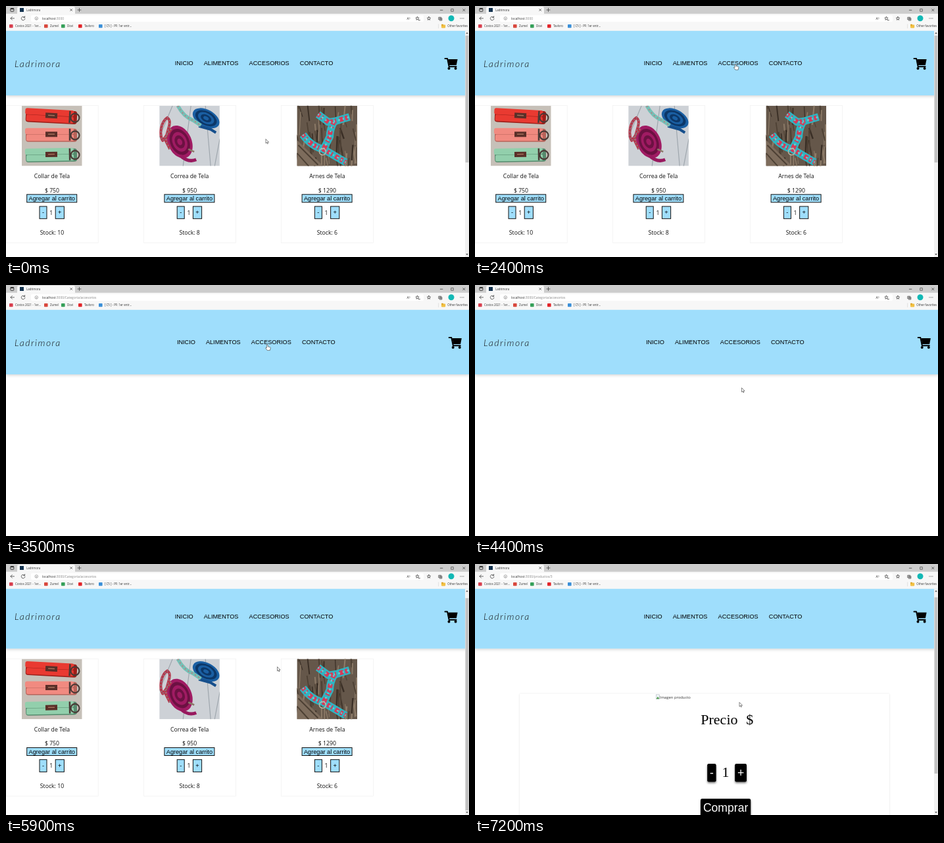
An HTML page that plays this animation: 704 px wide and 382 px high, repeating every 8 s.

```html
<!DOCTYPE html>
<html lang="es">
<head>
<meta charset="utf-8">
<title>Ladrimora</title>
<style>
  html, body { margin: 0; width: 100%; height: 100%; overflow: hidden; background: #fff; }
  svg { display: block; position: absolute; left: 0; top: 0; }
  text { white-space: pre; }
  .ui { font: 4.9px "Open Sans", "Noto Sans", sans-serif; fill: #333; }
  .mark { font-size: 4.4px; }
  .nav { font: 9.17px "Liberation Sans", Arial, sans-serif; }
  .body { font: 8.7px "Open Sans", "Noto Sans", sans-serif; fill: #111; }
  .serif { font: 22px "Liberation Serif", "Times New Roman", serif; }
  .big { font: 17.6px "Liberation Sans", Arial, sans-serif; fill: #fff; }
  .logo { font: italic 300 14px Lato, sans-serif; letter-spacing: 1.5px; fill: #111; }
  .mid { text-anchor: middle; }
  .line { fill: none; stroke: #444; stroke-width: .8; stroke-linecap: round; stroke-linejoin: round; }
</style>
</head>
<body>
<svg id="stage" width="704" height="382" viewBox="0 0 704 382"></svg>
<script>
const LOOP = 8000, TICK = 100;
const BLUE = '#9fdefc';

const rect = (x, y, w, h, fill, extra = '') =>
  `<rect x="${x}" y="${y}" width="${w}" height="${h}" fill="${fill}" ${extra}/>`;
const dot = (x, y, r, fill) => `<circle cx="${x}" cy="${y}" r="${r}" fill="${fill}"/>`;
const text = (x, y, cls, s, extra = '') => `<text x="${x}" y="${y}" class="${cls}" ${extra}>${s}</text>`;
const line = (d, extra = '') => `<path class="line" d="${d}" ${extra}/>`;
const stroke = (d, color, width, extra = '') =>
  `<path d="${d}" fill="none" stroke="${color}" stroke-width="${width}" stroke-linejoin="round" ${extra}/>`;
const group = (id, s, extra = '') => `<g id="${id}" ${extra}>${s}</g>`;

function seeded(seed) {
  return () => (seed = seed * 16807 % 2147483647) / 2147483647;
}

// Product pictures, each 91.7 square
function collars() {
  const strap = (y, color, dark, tilt) => `<g transform="rotate(${tilt} 46 ${y})">` +
    rect(6, y - 9, 78, 20, dark, 'rx="4"') + rect(5, y - 10, 74, 9.5, color, 'rx="3"') +
    rect(7, y, 72, 9.5, color, 'rx="2"') + rect(36, y - 4.5, 18, 8, '#5a2f28') +
    rect(40, y - 1.5, 10, 1.5, '#a3705a') +
    stroke(`M73 ${y - 9}V${y + 9}`, '#4a3a36', 2.5) +
    `<circle cx="81" cy="${y + 1}" r="6.5" fill="none" stroke="#4a3a36" stroke-width="2.2"/></g>`;
  return rect(0, 0, 91.7, 91.7, '#c6c0b8') +
    strap(15.5, '#e93a31', '#9c1f1a', 3) + strap(44, '#f18a80', '#b8635a', 0) +
    strap(74.5, '#92cfac', '#568b6e', -1);
}

function leashes() {
  const coil = (x, y, rx, ry, tilt, a, b) => [1, .8, .6, .4, .2].map((k, i) =>
    `<ellipse cx="${x}" cy="${y}" rx="${rx * k}" ry="${ry * k}" fill="${i % 2 ? b : a}" transform="rotate(${tilt} ${x} ${y})"/>`).join('');
  const loop = 'M28 0Q37 17 51 22L63 30';
  const strap = 'M18 35L5 53C-1 42 3 24 12 18Q18 22 14 34L9 52L16 66';
  return rect(0, 0, 91.7, 91.7, '#cdd1d6') +
    stroke('M20 0L0 48M48 0L36 92M70 0L78 92M92 50L84 92', '#9ea6ad', 1.2) +
    coil(71, 19, 22, 13, 28, '#1a5fa3', '#0c3768') +
    stroke('M60 31L78 36L86 41', '#164f8c', 4) +
    stroke(loop, '#75c0b6', 5.5) + stroke(loop, '#c96d78', 1.5, 'stroke-dasharray="2 4"') +
    coil(31, 55, 18, 26, -24, '#a01b63', '#6c1142') +
    stroke('M32 76Q44 87 56 82', '#98195e', 5) +
    stroke(strap, '#b5364a', 4) + stroke(strap, '#78989c', 1.2, 'stroke-dasharray="2 3"') +
    stroke('M44 66L53 70', '#8c7868', 2.5);
}

function harness() {
  const bands = 'M32 13L48 25L60 23L80 17M56 25Q50 36 50 47L40 67M9 44Q22 62 40 66L74 86';
  const random = seeded(7);
  const bark = Array.from({ length: 60 }, (_, i) => {
    const x = random() * 92, y = random() * 92 - 12;
    return stroke(`M${x} ${y}l${6 - random() * 10} ${14 + random() * 22}`,
      ['#3a2f26', '#8d7b68', '#4d4034'][i % 3], 1 + random() * 1.6);
  }).join('');
  return rect(0, 0, 91.7, 91.7, '#65574a') + bark +
    '<path d="M0 52L40 92H0Z" fill="#7d6c5c"/>' +
    stroke('M2 60L32 90M0 72L18 92', '#4d4034', 2) +
    stroke(bands, '#2fb4c2', 11.5) +
    stroke(bands, '#d63a58', 7, 'stroke-dasharray="4 3 2 5 6 3"') +
    stroke(bands, '#62cdd0', 2.5, 'stroke-dasharray="2 5 3 4"') +
    '<circle cx="39" cy="70" r="5" fill="none" stroke="#b9b6a5" stroke-width="1.5"/>';
}

function product(i, picture, name, price, stock) {
  const btn = (x, y, w, h, label, ty) =>
    rect(x, y, w, h, BLUE, 'stroke="#111" stroke-width="1"') +
    text(x + w / 2, ty, 'nav mid', label);
  return `<g transform="translate(${209.2 * i} 0)">` +
    rect(.2, 151.5, 140, 209, '#fff', 'stroke="#f0f0f0" stroke-width=".7"') +
    `<svg x="24" y="151.8" width="91.7" height="91.7">${picture}</svg>` +
    text(70, 262.3, 'body mid', name) + text(70, 283.6, 'body mid', '$ ' + price) +
    btn(31.7, 286.8, 76, 12, 'Agregar al carrito', 296) +
    btn(51, 305, 11, 18.7, '-', 317.3) + btn(75.2, 305, 13.2, 18.7, '+', 317.3) +
    text(68.7, 317.8, 'body mid', '1') + text(70, 348.4, 'body mid', 'Stock: ' + stock) + '</g>';
}

function cart() {
  return stroke('M667.5 79.9H671.1L673.7 92.3H684.6', '#000', 2, 'stroke-linecap="round"') +
    '<path d="M672.2 81H686.6L684.9 89.9H674Z"/>' + dot(673.5, 95, 2) + dot(683.6, 95, 2);
}

function header() {
  const links = [[256.7, 'INICIO'], [300.7, 'ALIMENTOS'], [369.6, 'ACCESORIOS'], [446.8, 'CONTACTO']];
  return rect(0, 30, 704, 106, BLUE, 'filter="url(#soft)"') +
    text(13, 92.5, 'logo', 'Ladrimora') +
    group('links', links.map(([x, s]) => text(x, 90.2, 'nav', s)).join('')) + group('cart', cart());
}

function detail() {
  const btn = (x, y, w, h, label, ty) =>
    rect(x, y, w, h, '#000', 'rx="2.2" filter="url(#drop)"') + text(x + w / 2, ty, 'big mid', label);
  return rect(68, 205, 562, 220, '#fff', 'filter="url(#faint)"') +
    rect(275.4, 206.2, 5, 6.6, '#f3f7fb', 'stroke="#9aa5ad" stroke-width=".5"') +
    '<path d="M275.6 212.6L278 209L280.3 212.6Z" fill="#4f9d4c"/>' +
    text(281, 212, 'ui', 'Imagen producto', 'style="font-size:5.85px"') +
    text(343.3, 251.5, 'serif', 'Precio') + text(412.3, 251.5, 'serif', '$') +
    btn(353.2, 311.3, 13.4, 27.5, '-', 331) + btn(395.2, 311.3, 17.8, 27.5, '+', 331) +
    text(381, 331, 'serif mid', '1') + btn(343, 364.5, 76.2, 28, 'Comprar', 384.3);
}

function browser() {
  const marks = [
    [5, 14, '#d8404f', 'Costos 2021 - 1er...'], [58, 67, '#d9493e', 'Zumel'], [84, 93, '#36a05a', 'Dovi'],
    [110, 119, '#e2262a', 'Tavloro'], [141, 150, '#3a8fd8', '[ C5 ] - PF: 1er entr...']];
  return rect(0, 0, 704, 12.5, '#cdcdcd') + rect(0, 11.8, 704, 26, '#f7f7f7') +
    rect(17, 1, 88, 14, '#f7f7f7', 'rx="2.5"') + rect(38, 14, 597, 10, '#fff', 'rx="2"') +
    rect(6.8, 3.5, 5, 4.8, 'none', 'stroke="#333" stroke-width=".9" rx=".8"') + rect(7, 3.5, 4.8, 1.6, '#333') +
    rect(21, 3, 6, 6, '#14334f') + text(31, 7.6, 'ui mark', 'Ladrimora') +
    line('M97.8 4.6l2.8 2.8m0-2.8l-2.8 2.8M109 6h5m-2.5-2.5v5') +
    line('M660.3 6.3h3.6M694.7 4.6l3.2 3.2m0-3.2l-3.2 3.2') +
    rect(676.8, 4.7, 3.4, 3.4, 'none', 'stroke="#444" stroke-width=".7"') +
    line('M12.5 18.8H7m2.4-2.4L7 18.8l2.4 2.4') +
    line('M28.3 17.2A2.8 2.8 0 1 0 28.9 19.3M28.6 15.6v2h-2') +
    '<circle cx="46.3" cy="18.9" r="2.3" fill="none" stroke="#777" stroke-width=".6"/>' +
    line('M46.3 18.6v1.4', 'style="stroke:#777"') +
    `<text x="55" y="20.6" class="ui">localhost<tspan id="path" fill="#858585"></tspan></text>` +
    text(609.5, 21, 'ui', 'A<tspan dy="-1.5" font-size="3">))</tspan>') +
    line('M625.5 16.3l.8 1.6 1.8.2-1.3 1.3.3 1.8-1.6-.8-1.6.8.3-1.8-1.3-1.3 1.8-.2ZM627.5 21.5h2') +
    line('M643 16.3l.8 1.6 1.8.2-1.3 1.3.3 1.8-1.6-.8-1.6.8.3-1.8-1.3-1.3 1.8-.2Z') +
    line('M658.2 17.2h3.6v3.6h-3.6zM660 18v2m-1-1h2M659.4 22h3.4v-3.4') +
    dot(677, 18.8, 4.5, '#12b8b5') + [691, 693.4, 695.8].map(x => dot(x, 18.8, .6, '#444')).join('') +
    marks.map(([x, tx, c, s]) => rect(x, 28, 5.6, 5.2, c, 'rx=".8"') + text(tx, 32.4, 'ui mark', s)).join('') +
    rect(657.4, 27.5, .5, 6.5, '#ccc') + rect(662, 28.6, 6.2, 4.8, '#f2c144', 'rx=".8"') +
    rect(662, 27.8, 3, 2, '#dca52c', 'rx=".5"') +
    text(671.3, 32.4, 'ui mark', 'Other favorites');
}

const stage = document.getElementById('stage');
stage.innerHTML = `<defs>
  <filter id="soft" x="-5%" y="-10%" width="110%" height="130%"><feDropShadow dx="0" dy="1.5" stdDeviation="2" flood-opacity=".17"/></filter>
  <filter id="drop" x="-40%" y="-30%" width="180%" height="180%"><feDropShadow dx="0" dy="2" stdDeviation="1.8" flood-opacity=".5"/></filter>
  <filter id="faint" x="-5%" y="-8%" width="110%" height="120%"><feDropShadow dx="0" dy="0" stdDeviation="1.2" flood-opacity=".14"/></filter>
  </defs>` + rect(0, 0, 704, 382, '#fff') +
  group('page',
    group('shop', product(0, collars(), 'Collar de Tela', 750, 10) +
      product(1, leashes(), 'Correa de Tela', 950, 8) + product(2, harness(), 'Arnes de Tela', 1290, 6)) +
    group('detail', detail()) + header()) +
  group('bar', rect(698, 37.8, 6, 345, '#f1f1f1') + '<rect id="thumb" x="698.6" width="4.8" fill="#c1c1c1"/>' +
    '<path d="M699.2 42.3h3.6L701 40ZM699.2 377h3.6L701 379.3Z" fill="#555"/>') +
  browser() +
  group('arrow', '<path d="M0 0V6.4L1.5 5.1L2.5 7.3L3.5 6.8L2.5 4.7H4.6Z" fill="#fff" stroke="#333" stroke-width=".6"/>') +
  group('hand', '<path d="M0 .8Q1 0 1.8 .8V3.4L5.2 4.2Q6 4.6 5.8 5.6L5 9H.8L-1.8 5.6Q-1.6 4.4 0 5.4Z" fill="#fff" stroke="#333" stroke-width=".6"/>');

const el = Object.fromEntries([...stage.querySelectorAll('[id]')].map(n => [n.id, n]));
const show = (node, on) => node.setAttribute('display', on ? 'inline' : 'none');
const move = (node, x, y) => node.setAttribute('transform', `translate(${x} ${y})`);

// Pointer stops: time, x, y
const POINTER = [
  [0, 395, 202.5], [900, 394, 195], [1500, 387.5, 135], [1900, 394, 89], [2800, 396, 87.5], [3400, 396, 87.5],
  [4200, 405, 155], [4400, 405.5, 156.5], [5100, 412.5, 156.5], [5900, 412.5, 156.5],
  [6600, 462, 196], [6800, 462, 196], [7200, 402, 210.5], [LOOP, 402, 210.5]];

function pointerAt(t) {
  const i = POINTER.findIndex(p => p[0] > t);
  const [t0, x0, y0] = POINTER[i - 1], [t1, x1, y1] = POINTER[i];
  const u = (t - t0) / (t1 - t0), k = u * u * (3 - 2 * u);
  return [x0 + (x1 - x0) * k, y0 + (y1 - y0) * k];
}

const VIEW = 343, TRACK = 330;
const HOME = { path: '', height: 586 };
const CATEGORY = { path: '/Categoria/accesorios', height: 350.3 };
const DETAIL = { path: '/productos/3', height: 422 };

function draw(t) {
  const route = t >= 6800 ? DETAIL : t >= 3400 ? CATEGORY : HOME;
  const loading = t >= 3400 && t < 5400;
  const onDetail = route === DETAIL;
  const scroll = t >= 5800 ? 7.3 : 0;

  el.path.textContent = ':3000' + route.path;
  show(el.shop, !loading && !onDetail);
  show(el.detail, onDetail);
  show(el.bar, !loading);
  move(el.page, 0, -scroll);
  move(el.links, loading ? 3.2 : 0, 0);
  move(el.cart, loading ? 6.2 : 0, 0);
  el.thumb.setAttribute('y', 45 + scroll * TRACK / route.height);
  el.thumb.setAttribute('height', VIEW * TRACK / route.height);

  const [x, y] = pointerAt(t);
  const onLink = x > 369 && x < 431 && y > 82 && y < 93;
  const onPicture = !loading && !onDetail && x > 443 && x < 534 && y > 144 && y < 236;
  const hand = onLink || onPicture;
  show(el.hand, hand);
  show(el.arrow, !hand);
  move(hand ? el.hand : el.arrow, x, y);
}

function frame(now) {
  draw(Math.floor((now % LOOP) / TICK) * TICK);
  requestAnimationFrame(frame);
}
draw(0);
requestAnimationFrame(frame);
</script>
</body>
</html>
```
